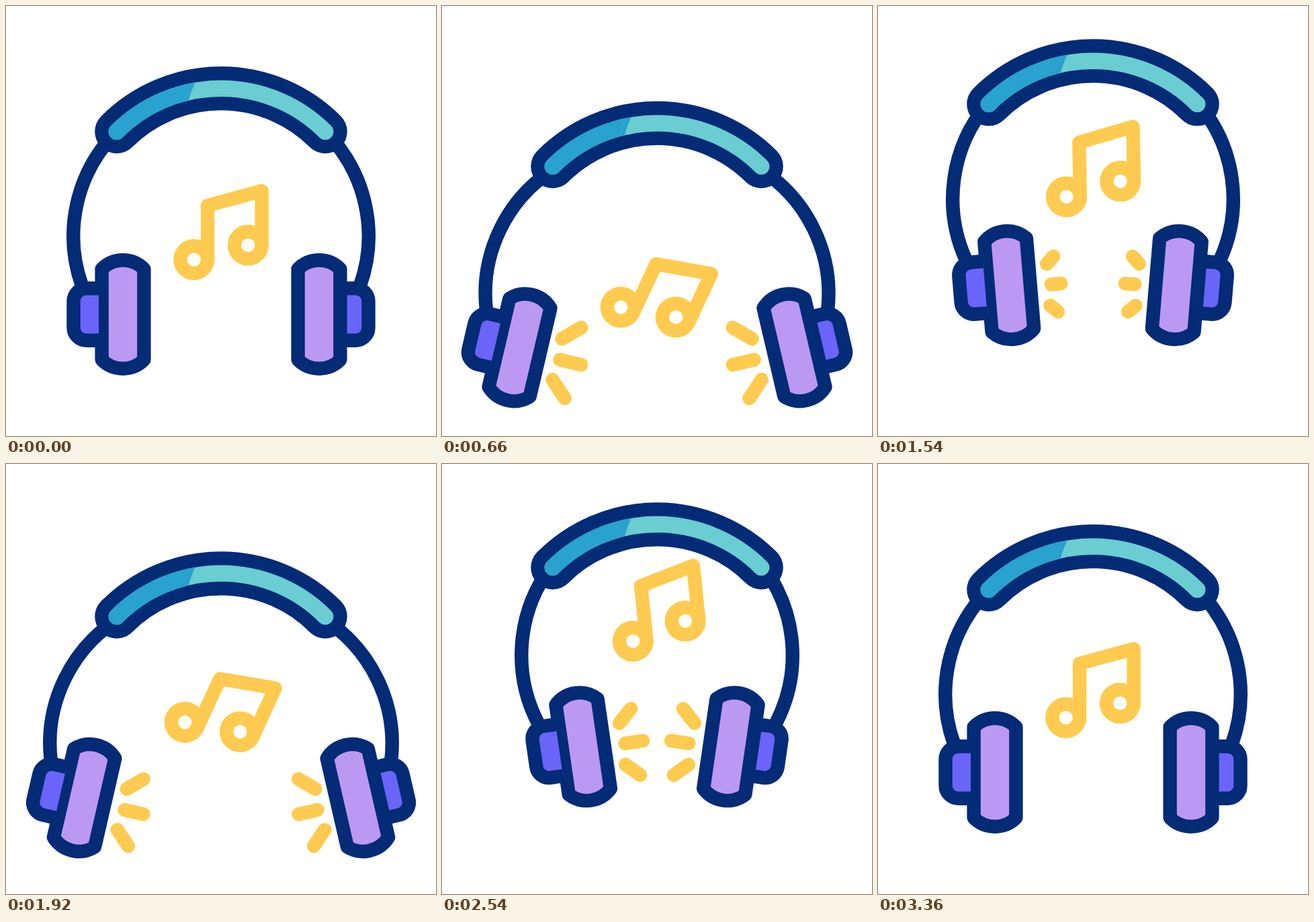
These frames come from a looping animation (640x640 px, 3.6 s). An HTML page:

```html
<!DOCTYPE html>
<html lang="en">
<head>
<meta charset="utf-8">
<title>Headphones</title>
<style>
  html, body { margin: 0; width: 100%; height: 100%; overflow: hidden; background: #fff; }
  svg { display: block; width: 100vw; height: 100vh; }
  .line { stroke: #042b76; stroke-width: 20.4; stroke-linejoin: round; }
  .gold { fill: none; stroke: #fecb50; stroke-width: 20.4; stroke-linecap: round; stroke-linejoin: round; }
  .band { fill: none; stroke-linecap: round; }
</style>
</head>
<body>
<svg viewBox="0 0 640 640">
  <defs>
    <clipPath id="shade"><path d="M100 80H297L288 100Q277 121 270 146L180 240H100Z"/></clipPath>
    <path id="arc" d="M164.8 187A219.5 219.5 0 0 1 475.2 187"/>
    <g id="cup">
      <path class="line" fill="none" d="M164.8 187A219.5 219.5 0 0 0 113 416"/>
      <path class="line" fill="#bb99f2" d="M142.6 391.4A44.2 44.2 0 0 1 205.4 391.4V526.6A44.2 44.2 0 0 1 142.6 526.6Z"/>
    </g>
    <path id="pad" class="line" fill="#6a64f9" d="M138 420.3H119.5A19 19 0 0 0 100.5 439.3V478.7A19 19 0 0 0 119.5 497.7H138"/>
  </defs>
  <g id="body">
    <g class="side">
      <use href="#cup"/>
      <use href="#pad"/>
      <path class="gold rays"/>
    </g>
    <g transform="matrix(-1 0 0 1 640 0)">
      <g class="side">
        <use href="#pad"/>
        <use href="#cup"/>
        <path class="gold rays"/>
      </g>
    </g>
    <use href="#arc" class="band" stroke="#042b76" stroke-width="65.2"/>
    <use href="#arc" class="band" stroke="#69cdd2" stroke-width="24.5"/>
    <g clip-path="url(#shade)"><use href="#arc" class="band" stroke="#28a2ce" stroke-width="24.5"/></g>
  </g>
  <g id="note" class="gold">
    <path d="M300 377.5V297L380.6 275.2V356"/>
    <circle cx="279.7" cy="377.5" r="20.3"/>
    <circle cx="360.3" cy="356" r="20.3"/>
  </g>
</svg>
<script>
  const LOOP = 3600;
  const swingTimes = [0, 590, 1305, 2002, 2700, 3300];
  const bounceTimes = [0, 650, 1364, 2062, 2760, 3360];

  const body = document.getElementById('body');
  const note = document.getElementById('note');
  const sides = document.querySelectorAll('.side');
  const rays = document.querySelectorAll('.rays');

  // Eased value between keys, held after the last one
  function track(times, values, t) {
    const i = times.findIndex(k => k > t);
    if (i < 0) return values[values.length - 1];
    const u = (t - times[i - 1]) / (times[i] - times[i - 1]);
    return values[i - 1] + (values[i] - values[i - 1]) * u * u * (3 - 2 * u);
  }

  const swing = (values, t) => track(swingTimes, values, t);

  function rayPath(len) {
    const dx = len * 0.74, dy = len * 0.7;
    return `M232.4 432l${dx} ${-dy}M236.4 463h${len}M232.4 494.3l${dx} ${dy}`;
  }

  function draw(t) {
    const drop = track(bounceTimes, [0, 51.8, -58.7, 51.8, -58.7, 0], t);
    const tilt = swing([0, 13.9, -11.6, 13.9, -11.6, 0], t);
    const len = swing([0, 33.4, 9.2, 29.4, 26.4, 0], t);
    const turn = swing([0, 26.1, -11, 26.1, -11, 0], t);
    const rise = swing([0, 98.5, -141, 34, -141, 0], t);

    body.setAttribute('transform', `translate(0 ${drop})`);
    sides.forEach(s => s.setAttribute('transform', `rotate(${tilt} 155 205)`));
    rays.forEach(r => {
      r.setAttribute('d', rayPath(len));
      r.setAttribute('visibility', len > 0.05 ? 'visible' : 'hidden');
    });
    note.setAttribute('transform', `translate(0 ${rise}) rotate(${turn} 320 336.5)`);
  }

  const start = performance.now();
  function tick() {
    draw((performance.now() - start) % LOOP);
    requestAnimationFrame(tick);
  }
  draw(0);
  requestAnimationFrame(tick);
</script>
</body>
</html>
```
